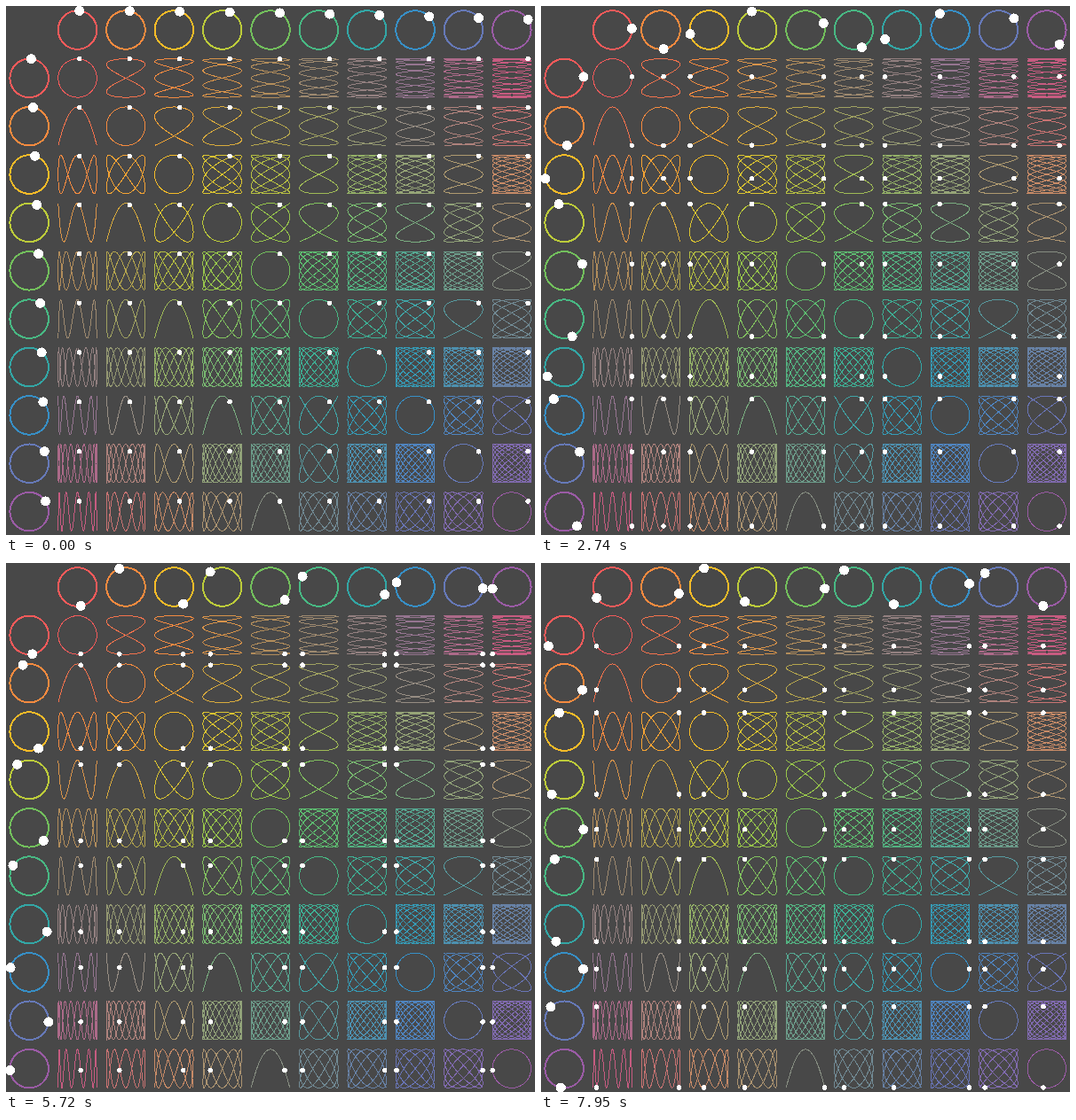
An HTML page for the animation above (8 s loop, 596 px wide and 597 px high).

```html
<!DOCTYPE html>
<html lang="en">
<head>
<meta charset="utf-8">
<title>Lissajous table</title>
<style>
  html, body { margin: 0; width: 100%; height: 100%; overflow: hidden; background: #484848; }
  svg { display: block; shape-rendering: crispEdges; }
  path { fill: none; }
  circle { fill: #fff; }
</style>
</head>
<body>
<svg id="stage" width="596" height="597" viewBox="0 0 596 597"></svg>
<script>
const LOOP = 8000, STEP = 77, FIRST_STEP = 42;   // ms
const START_ANGLE = 5.75, STEP_ANGLE = 2.226;    // degrees, clockwise from the top
const COUNT = 10, PITCH = 54.36, RADIUS = 0.4 * PITCH;
const LEFT = 26.2, TOP = 27;
const COLORS = ['#f25a5a', '#f58a3f', '#f5bb28', '#bccb3a', '#72bf5c',
                '#48b883', '#33a6a5', '#378fc6', '#6679b8', '#9a5ba5'];

const stage = document.getElementById('stage');
const curves = addShape('g', {}, stage);
const dots = addShape('g', {}, stage);
const cells = [];

function addShape(name, attributes, parent) {
  const shape = document.createElementNS(stage.namespaceURI, name);
  for (const key in attributes) shape.setAttribute(key, attributes[key]);
  return parent.appendChild(shape);
}

// A header cell turns both axes at its own speed; inner cells combine column and row.
function pointIn({ col, row }, angle) {
  return [LEFT + PITCH * col + RADIUS * Math.sin((col || row) * angle),
          TOP + PITCH * row - RADIUS * Math.cos((row || col) * angle)];
}

function curvePath(cell) {
  const points = Array.from({ length: 721 }, (_, i) =>
    pointIn(cell, i * Math.PI / 360).map(v => v.toFixed(2)));
  return 'M' + points.join('L');
}

function addCell(col, row) {
  const cell = { col, row };
  const isHeader = !col || !row;
  const [first, second] = [col || row, row || col].map(speed => COLORS[speed - 1]);
  const curve = addShape('path', { d: curvePath(cell), 'stroke-width': isHeader ? 2 : 1 }, curves);
  curve.style.stroke = `color-mix(in srgb, ${first}, ${second})`;
  cell.dot = addShape('circle', { r: isHeader ? 5.5 : 2.75 }, dots);
  cells.push(cell);
}

for (let row = 0; row <= COUNT; row++) {
  for (let col = 0; col <= COUNT; col++) {
    if (row || col) addCell(col, row);
  }
}

function drawFrame(time) {
  const step = Math.floor((time + STEP - FIRST_STEP) / STEP);
  const angle = (START_ANGLE + STEP_ANGLE * step) * Math.PI / 180;
  for (const cell of cells) {
    const [x, y] = pointIn(cell, angle);
    cell.dot.setAttribute('cx', x);
    cell.dot.setAttribute('cy', y);
  }
}

const startTime = performance.now();
function tick() {
  drawFrame((performance.now() - startTime) % LOOP);
  requestAnimationFrame(tick);
}
tick();
</script>
</body>
</html>
```
